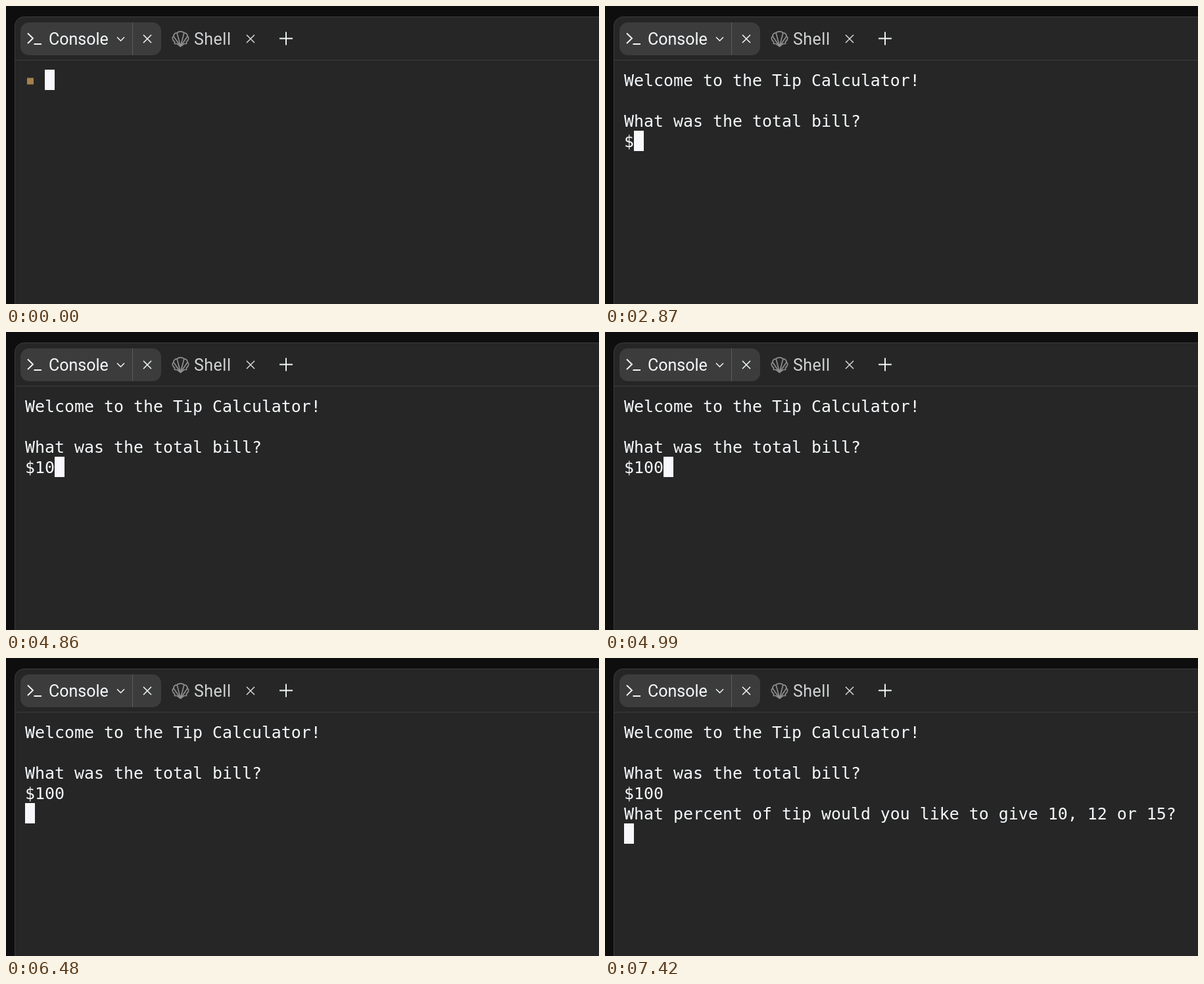
Animation of 902 by 454 pixels, one loop 8000 ms. Source, as an HTML page:

```html
<!DOCTYPE html>
<html lang="en">
<head>
<meta charset="utf-8">
<title>Tip calculator console</title>
<style>
  html, body { margin: 0; width: 100%; height: 100%; overflow: hidden; background: #0e0e0e; }
  svg { display: block; width: 902px; height: 454px; }
  .tab { font: 25px Roboto, "Noto Sans", sans-serif; }
  .term { font: 24.92px "DejaVu Sans Mono", monospace; fill: #f5f9fc; white-space: pre; }
  .icon { fill: none; stroke: #f5f9fc; stroke-width: 1.7; }
  .shell { fill: none; stroke: #8e8e8e; stroke-width: 1.7; stroke-linejoin: round; stroke-linecap: round; }
</style>
</head>
<body>
<svg viewBox="0 0 902 454">
  <rect x="13.5" y="16.5" width="920" height="470" rx="14" fill="#262626" stroke="#3c3c3c"/>
  <path d="M14 82.5H902" stroke="#3c3c3c"/>
  <rect x="22" y="25" width="214" height="50" rx="13" fill="#3c3c3c"/>
  <path d="M192.5 25V75" stroke="#5c5c5c"/>

  <g class="icon">
    <path d="M33 41.5L41 49.2L33 57M42.5 58H54" stroke-width="1.9"/>
    <path d="M169 47.5L174.5 53L180 47.5" stroke-width="1.5"/>
    <path d="M209 44L221 56M221 44L209 56" stroke-width="1.5"/>
    <path d="M366 44L378 56M378 44L366 56" stroke="#d8d8d8" stroke-width="1.5"/>
    <path d="M416 49.5H436M426 39.5V59.5" stroke-width="1.9"/>
  </g>
  <text class="tab" x="65" y="59" fill="#f5f9fc">Console</text>
  <text class="tab" x="286" y="59" fill="#d0d2d4" letter-spacing=".5">Shell</text>

  <g class="shell">
    <path d="M265.5 61.5L260 57.5H256.5V54.5C252.5 51.5 252.5 47.5 255 46.2C255 42.5 257.5 40.6 260.2 41.2C262 38 269 38 270.8 41.2C273.5 40.6 276 42.5 276 46.2C278.500 47.5 278.500 51.5 274.5 54.5V57.5H271Z"/>
    <path d="M265.5 61.5L260.200 41.2M265.5 61.5L270.800 41.2M265.5 61.5L255 46.2M265.5 61.5L276 46.2"/>
  </g>

  <rect id="prompt" x="32" y="109.500" width="10" height="10" fill="#a5814d"/>
  <g id="lines"></g>
  <rect id="cursor" width="15" height="31" fill="#f8f8fc"/>
</svg>
<script>
const LOOP = 8000, LEFT = 29, TOP = 97, CELL = 15, ROW = 31;
const intro = ["Welcome to the Tip Calculator!", "", "What was the total bill?"];
const ask = "What percent of tip would you like to give 10, 12 or 15?";

// Start time, printed lines; the cursor follows the last line.
const steps = [
  [0, ["  "]],
  [990, [...intro, "$"]],
  [4130, [...intro, "$1"]],
  [4860, [...intro, "$10"]],
  [4990, [...intro, "$100"]],
  [6480, [...intro, "$100", ""]],
  [6550, [...intro, "$100", ask, ""]]
];

const byId = id => document.getElementById(id);
const prompt = byId("prompt"), cursor = byId("cursor");
const rows = Array.from({ length: 6 }, (_, i) => {
  const text = document.createElementNS("http://www.w3.org/2000/svg", "text");
  text.setAttribute("class", "term");
  text.setAttribute("x", LEFT);
  text.setAttribute("y", TOP + i * ROW + 25);
  byId("lines").append(text);
  return text;
});

let shown = -1;

function draw(time) {
  const index = steps.findLastIndex(([at]) => at <= time);
  if (index === shown) return;
  shown = index;
  const lines = steps[index][1], last = lines.length - 1;
  rows.forEach((row, i) => { row.textContent = lines[i] || ""; });
  prompt.style.display = index ? "none" : "";
  cursor.setAttribute("x", LEFT + lines[last].length * CELL);
  cursor.setAttribute("y", TOP + last * ROW);
}

const start = performance.now();
function tick() {
  draw((performance.now() - start) % LOOP);
  requestAnimationFrame(tick);
}
tick();
</script>
</body>
</html>
```
